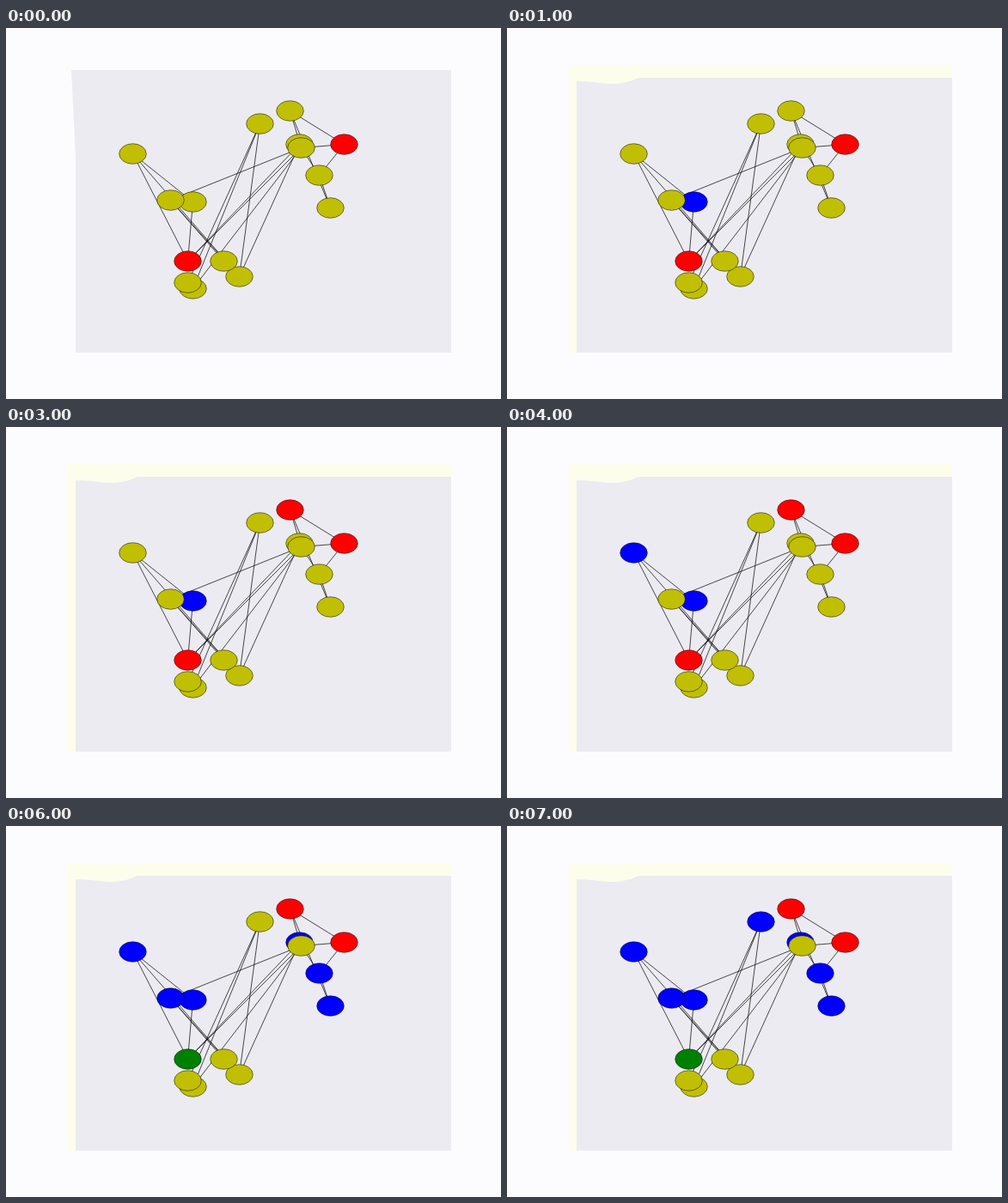
Recreate the animation shown at these times as an HTML page with a canvas. Size 576 by 432 pixels, loop 8 s.

```html
<!DOCTYPE html>
<html lang="en">
<head>
<meta charset="utf-8">
<title>Network states</title>
<style>
html, body { margin: 0; width: 100%; height: 100%; overflow: hidden; background: #fcfcff; }
canvas { display: block; }
</style>
</head>
<body>
<canvas id="stage" width="576" height="432"></canvas>
<script>
const ctx = document.getElementById('stage').getContext('2d');
const STEP = 1000, STEPS = 8;
const YELLOW = '#c1bf04', RED = '#f00', BLUE = '#00f', GREEN = '#008000';
const LEFT = 81, RIGHT = 518, BOTTOM = 378;

const node = (x, y, colour = YELLOW, changeStep = Infinity, nextColour = BLUE) =>
  ({ x: x + 0.5, y: y + 0.5, colour, changeStep, nextColour });

// Listed back to front.
const nodes = {
  a: node(295, 111, YELLOW, 7),
  b: node(330, 96, YELLOW, 3, RED),
  c: node(341, 135, YELLOW, 6),
  d: node(343, 139),
  e: node(393, 135, RED),
  f: node(364, 171, YELLOW, 5),
  g: node(377, 209, YELLOW, 6),
  h: node(147, 146, YELLOW, 4),
  j: node(217, 202, YELLOW, 1),
  i: node(191, 200, YELLOW, 6),
  k: node(211, 271, RED, 6, GREEN),
  m: node(271, 289),
  l: node(253, 271),
  o: node(217, 303),
  n: node(211, 296)
};
const edges = 'be bd bg ed ef df fg di ck dk do cm an ao am hk hj hm il im jk'.split(' ');

function drawPanel(step) {
  ctx.fillStyle = '#fcfcff';
  ctx.fillRect(0, 0, 576, 432);
  if (step > 0) {
    ctx.fillStyle = '#fdfdec';
    ctx.fillRect(72, 43, RIGHT - 72, BOTTOM - 43);
  }
  ctx.fillStyle = '#ebebf1';
  ctx.beginPath();
  ctx.moveTo(RIGHT, BOTTOM);
  ctx.lineTo(LEFT, BOTTOM);
  if (step > 0) {
    ctx.lineTo(LEFT, 62);
    ctx.bezierCurveTo(110, 62, 125, 71, 153, 58);
    ctx.lineTo(RIGHT, 58);
  } else {
    ctx.lineTo(LEFT, 150);
    ctx.lineTo(76, 49);
    ctx.lineTo(RIGHT, 49);
  }
  ctx.fill();
}

function drawGraph(step) {
  ctx.strokeStyle = '#000';
  ctx.lineWidth = 0.7;
  for (const [from, to] of edges) {
    ctx.beginPath();
    ctx.moveTo(nodes[from].x, nodes[from].y);
    ctx.lineTo(nodes[to].x, nodes[to].y);
    ctx.stroke();
  }
  ctx.lineWidth = 0.5;
  for (const { x, y, colour, changeStep, nextColour } of Object.values(nodes)) {
    ctx.fillStyle = step < changeStep ? colour : nextColour;
    ctx.beginPath();
    ctx.ellipse(x, y, 15.8, 11.8, 0, 0, 2 * Math.PI);
    ctx.fill();
    ctx.stroke();
  }
}

const start = performance.now();
function frame() {
  const step = Math.floor((performance.now() - start) / STEP) % STEPS;
  drawPanel(step);
  drawGraph(step);
  requestAnimationFrame(frame);
}
frame();
</script>
</body>
</html>
```
